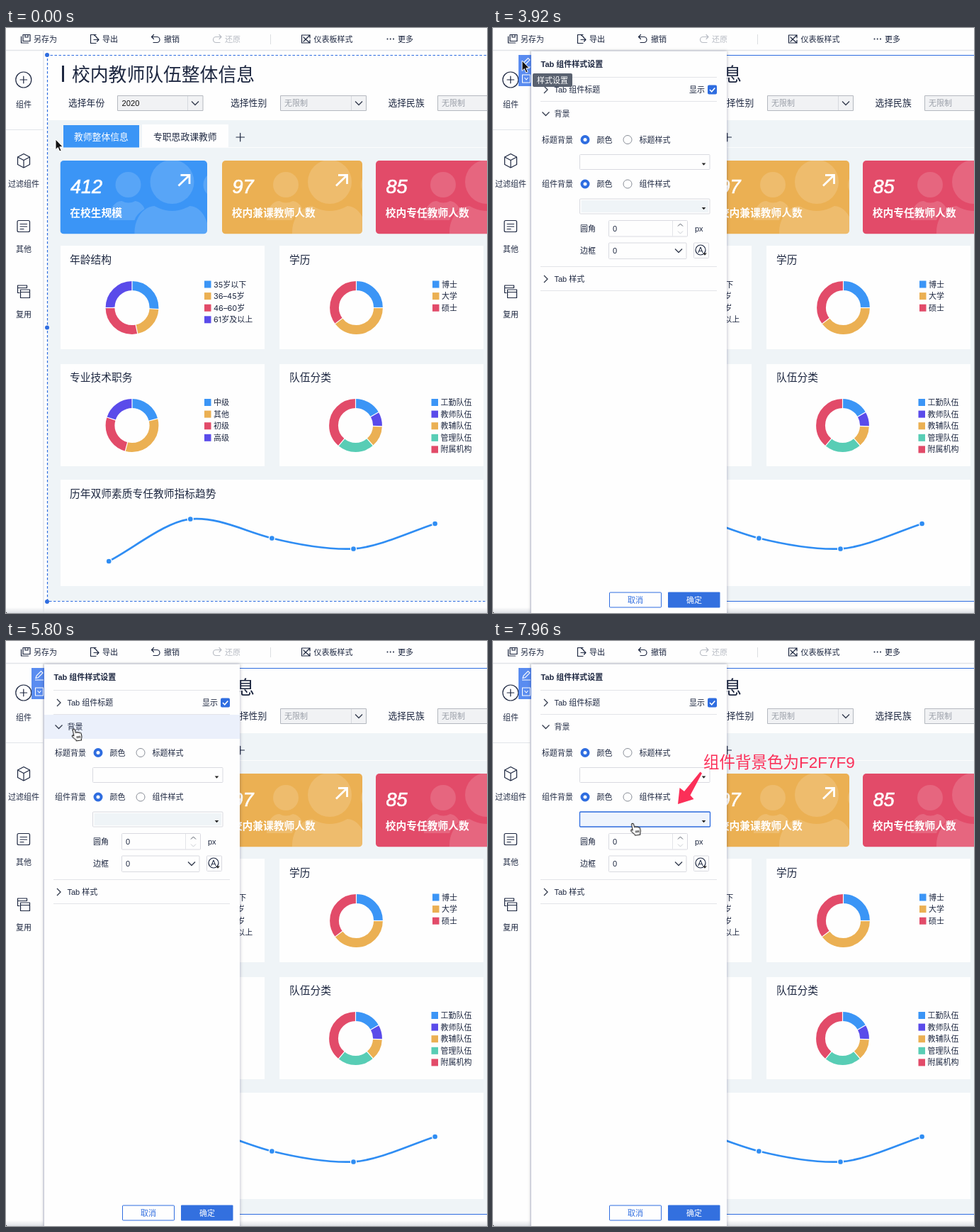
Write an HTML page that moves like this. It is 679 px wide and 825 px high and loops after 8000 ms.

```html
<!DOCTYPE html>
<html lang="zh-CN">
<head>
<meta charset="utf-8">
<title>Dashboard editor</title>
<style>
html, body { margin: 0; width: 100%; height: 100%; overflow: hidden; background: #fefefe; }
svg { display: block; }
#stage { width: 679px; height: 825px; }
text { font: 11px "Liberation Sans", "Noto Sans CJK SC", "Noto Sans CJK", sans-serif; fill: #1d2740; white-space: pre; }
.filter text { font-size: 12.8px; }
.filter .value { font-size: 11.2px; fill: #111; }
.filter .empty { font-size: 11px; fill: #9a9fa8; }
.heading { font-size: 14.75px; }
.legend text { font-family: Inter, "Noto Sans CJK SC", "Noto Sans CJK", sans-serif; }
.number { font-size: 27px; font-style: italic; fill: #fff; stroke: #fff; stroke-width: .7; }
.label { font-size: 14.75px; font-weight: 700; fill: #fff; }
.white { fill: #fff; }
.line { fill: none; stroke: #1d2740; stroke-width: 1.2; stroke-linejoin: round; stroke-linecap: round; }
.field { fill: #fefefe; stroke: #d9dae0; }
.active { stroke: #2f6de0; stroke-width: 1.3; }
.blue { fill: #2f6de0; }

.step { animation: 8s step-end infinite; }
.idle { animation-name: idle; }
.chosen { animation-name: chosen; }
.panel { animation-name: panel; }
.row1 { animation-name: row1; }
.row2 { animation-name: row2; }
.radius { animation-name: radius; }
.colour { animation-name: colour; }
.arrow { animation-name: arrow; }
.hand { animation-name: hand; }
.tip { animation: tip 8s linear infinite; }
.note { animation: note 8s linear infinite; }
.cursor { animation: move 8s linear infinite; }
@keyframes idle { 0% { opacity: 1 } 14%, 100% { opacity: 0 } }
@keyframes chosen { 0% { opacity: 0 } 14%, 100% { opacity: 1 } }
@keyframes panel { 0% { opacity: 0 } 49%, 100% { opacity: 1 } }
@keyframes row1 { 0% { opacity: 0 } 65% { opacity: 1 } 68%, 100% { opacity: 0 } }
@keyframes row2 { 0% { opacity: 0 } 68% { opacity: 1 } 73.5%, 100% { opacity: 0 } }
@keyframes radius { 0% { opacity: 0 } 76.8% { opacity: 1 } 80.3%, 100% { opacity: 0 } }
@keyframes colour { 0% { opacity: 0 } 75.8% { opacity: 1 } 76.8% { opacity: 0 } 80.3%, 100% { opacity: 1 } }
@keyframes arrow { 0% { opacity: 1 } 29% { opacity: 0 } 49% { opacity: 1 } 64.5%, 100% { opacity: 0 } }
@keyframes hand { 0% { opacity: 0 } 29% { opacity: 1 } 49% { opacity: 0 } 64.5%, 100% { opacity: 1 } }
@keyframes tip { 0%, 41.9% { opacity: 0 } 42%, 49.2% { opacity: 1 } 51.5%, 100% { opacity: 0 } }
@keyframes note { 0%, 87.4% { opacity: 0 } 97.5%, 100% { opacity: 1 } }
@keyframes move {
  0%, 23.3% { transform: translate(70px, 157px) }
  23.5% { transform: translate(69px, 155px); animation-timing-function: ease-in-out }
  33.5% { transform: translate(42px, 50px) }
  35.5%, 61.4% { transform: translate(41px, 46px); animation-timing-function: ease-in }
  67.5% { transform: translate(80px, 102px); animation-timing-function: ease-out }
  71.5% { transform: translate(89px, 113px); animation-timing-function: ease-in-out }
  77% { transform: translate(186px, 269px); animation-timing-function: ease-out }
  78.5% { transform: translate(188px, 277px); animation-timing-function: ease-in-out }
  81.5%, 100% { transform: translate(197px, 257px) }
}
</style>
</head>
<body>
<svg id="stage" viewBox="0 0 679 825">
  <defs>
    <path id="down" d="M-5-2.5 0 2.5 5-2.5" fill="none" stroke="#333b4d" stroke-width="1.3"/>
    <path id="right" d="M-2.5-5 2.5 0-2.5 5" fill="none" stroke="#333b4d" stroke-width="1.3"/>
    <path id="caret" d="M-2.8-1.5h5.6L0 1.8z" fill="#222"/>
    <g id="people" fill="#fff" fill-opacity=".15">
      <circle cx="96" cy="34" r="18"/>
      <circle cx="158" cy="30" r="31"/>
      <circle cx="220" cy="34" r="18"/>
      <path d="M69 84C69 68 77 57 87 57Q96 62 106 57C112 58 117 62 119 68Q107 76 105 84Z"/>
      <path d="M105 104C104 82 117 65 133 64Q158 78 183 64C199 65 209 82 210 104Z"/>
    </g>
    <linearGradient id="floor" x2="0" y2="1">
      <stop stop-color="#e1e4e8" stop-opacity="0"/><stop offset="1" stop-color="#dcdfe4"/>
    </linearGradient>
    <filter id="shadow" x="-10%" width="120%" y="-3%" height="106%">
      <feDropShadow dx="0" dy="0" stdDeviation="2.5" flood-color="#223" flood-opacity=".3"/>
    </filter>
  </defs>

  <rect width="679" height="825" fill="#fefefe"/>

  <!-- canvas -->
  <rect x="59" y="130" width="620" height="678" fill="#eff4f7"/>
  <rect x="79" y="53" width="3" height="23" fill="#1d2740"/>
  <text x="93" y="74.5" style="font-size:25.8px">校内教师队伍整体信息</text>

  <g class="filter">
    <text x="88" y="110.3">选择年份</text>
    <text x="317" y="110.3">选择性别</text>
    <text x="539.5" y="110.3">选择民族</text>
    <g fill="#f1f2f4" stroke="#b4b8bf">
      <path d="M157.5 95.5H278V116.5H157.5ZM387.5 95.5H508.5V116.5H387.5ZM609.5 95.5H700V116.5H609.5Z"/>
      <path d="M256.5 96V116M487.5 96V116" stroke="#d6d9de"/>
    </g>
    <text class="value" x="163.5" y="110">2020</text>
    <text class="empty" x="393" y="110">无限制</text>
    <text class="empty" x="615" y="110">无限制</text>
    <use href="#down" x="267" y="106"/><use href="#down" x="498" y="106"/>

    <path d="M59 168.5H679" stroke="#fbfcfd"/>
    <rect x="81" y="137" width="107" height="31.5" fill="#3b95f6"/>
    <rect x="192" y="136" width="122" height="32.5" fill="#fefefe"/>
    <text class="white" x="96" y="158">教师整体信息</text>
    <text x="208" y="158">专职思政课教师</text>
    <path class="line" d="M325 154h11.500M330.700 148.300v11.500"/>
  </g>

  <g id="stats"></g>

  <path fill="#fefefe" d="M77 307H365V453H77ZM386 307H674V453H386ZM77 474H365V618H77ZM386 474H674V618H386ZM77 637H674V787H77Z"/>
  <text class="heading" x="90" y="331.500">年龄结构</text>
  <text class="heading" x="400" y="331.500">学历</text>
  <text class="heading" x="90" y="498">专业技术职务</text>
  <text class="heading" x="400" y="498">队伍分类</text>
  <text class="heading" x="90" y="661.500">历年双师素质专任教师指标趋势</text>
  <g id="rings"></g>
  <path d="M145 752C180 734 225 696 260.500 692.500 300 689 340 711 375.500 719.500 410 728 455 736 490.500 734.500 526 732 570 711 605.500 699" fill="none" stroke="#2f8df3" stroke-width="2.800"/>
  <g id="dots" fill="#2f8df3" stroke="#fff" stroke-width="1.300"></g>

  <!-- selection frame -->
  <g fill="none" stroke="#2f6de0" stroke-width="1.200">
    <path class="step idle" stroke-dasharray="3.500 2.500" d="M690 38.500H58.500V808.500H690"/>
    <path class="step chosen" d="M690 38.500H58.500V808.500H690"/>
  </g>
  <g class="blue"><circle cx="58" cy="38" r="3"/><circle cx="58" cy="422.500" r="3"/><circle cx="58" cy="809" r="3"/></g>

  <!-- toolbar -->
  <path d="M0 31.500H679" stroke="#e2e5e9" stroke-width="1.500"/>
  <path d="M373.500 9V23" stroke="#dcdee2"/>
  <text x="39" y="19.600">另存为</text>
  <text x="136" y="19.600">导出</text>
  <text x="223" y="19.600">撤销</text>
  <text x="309" y="19.600" style="fill:#b8bcc4">还原</text>
  <text x="434.500" y="19.600">仪表板样式</text>
  <text x="553" y="19.600">更多</text>
  <g class="line">
    <path d="M24 9.500H34V18.500H24ZM27 9.500V13H31V9.500M21.500 12V21H31.500"/>
    <path d="M127 9.500H119.500V21.500H127M124 9.500 128 13V14M124 16.500H131M128.500 14 131 16.500 128.500 19"/>
    <path d="M208.500 9.500 205.500 12.500 208.500 15.500M206 12.500H213A4 4 0 0 1 213 20.500H208"/>
    <path style="stroke:#b8bcc4" d="M301 9.500 304 12.500 301 15.500M303 12.500H296.500A4 4 0 0 0 296.500 20.500H302"/>
    <path d="M424 10H417.500V21H429V17M420 13 423 16 420 19M429 10 423 16 429 21M425 10H429V14"/>
  </g>
  <g fill="#1d2740"><circle cx="538.500" cy="15.500" r="1"/><circle cx="542.700" cy="15.500" r="1"/><circle cx="547" cy="15.500" r="1"/></g>

  <!-- sidebar -->
  <path d="M53 32V825" stroke="#e3e6eb" stroke-width="1.500"/>
  <path d="M0 143.500H53" stroke="#e2e5e9"/>
  <g class="line">
    <circle cx="24.800" cy="73" r="11"/><path d="M20 73H29.600M24.800 68.200V77.800"/>
    <path d="M25 177.500 33.500 182V192.500L25 197 16.500 192.500V182ZM16.500 182 25 186.500 33.500 182M25 186.500V197"/>
    <rect x="16" y="271.500" width="17.500" height="16" rx="2"/><path d="M20 276.500H29.500M20 280H29.500M20 283.500H25"/>
    <path d="M19 373.500H16.500V363H29.500V366M16.500 366.500H29.500M20.500 369H33.500V380.500H20.500ZM20.500 372.500H33.500"/>
  </g>
  <text x="14" y="111.700">组件</text>
  <text x="3" y="223.700">过滤组件</text>
  <text x="14" y="315.700">其他</text>
  <text x="14" y="407.700">复用</text>
  <rect y="817" width="679" height="8" fill="url(#floor)"/>

  <g class="step chosen" fill="none" stroke="#fff" stroke-width="1.100">
    <path d="M36 38H58V82H36Z" fill="#5a8cf0" stroke="none"/>
    <path d="M42 52.500 43 49 49.500 42.500 52 45 45.500 51.500ZM41 55H53M41.500 66H52.500V77H41.500ZM44.500 70 47 73 49.500 70"/>
  </g>

  <!-- style panel -->
  <g class="step panel">
    <rect x="54" y="33" width="276" height="800" fill="#fefefe" filter="url(#shadow)"/>
    <path d="M67 69.500H316M67 103.500H316M67 336.500H316M67 370.500H316" stroke="#e3e4e8"/>
    <rect class="step row1" x="54" y="69" width="276" height="35" fill="#ebf0fb"/>
    <rect class="step row2" x="54" y="104" width="276" height="34" fill="#ebf0fb"/>
    <text x="67.500" y="55" font-weight="700" style="font-weight:700">Tab 组件样式设置</text>
    <use href="#right" x="74.500" y="87"/><text x="86.500" y="91">Tab 组件标题</text>
    <text x="277" y="91">显示</text>
    <rect class="blue" x="303" y="80.500" width="13" height="13" rx="2"/>
    <path d="M306 87 308.700 89.800 313.300 84.500" fill="none" stroke="#fff" stroke-width="1.600"/>
    <use href="#down" x="74.500" y="121"/><text x="86.500" y="125">背景</text>
    <use href="#right" x="74.500" y="354"/><text x="86.500" y="358">Tab 样式</text>

    <g fill="#fefefe">
      <circle cx="130" cy="157.500" r="4.500" stroke="#2f6de0" stroke-width="4"/>
      <circle cx="130" cy="220" r="4.500" stroke="#2f6de0" stroke-width="4"/>
      <circle cx="190" cy="157.500" r="6" stroke="#888d96"/>
      <circle cx="190" cy="220" r="6" stroke="#888d96"/>
    </g>
    <text x="69" y="161.700">标题背景</text><text x="146.500" y="161.700">颜色</text><text x="206.500" y="161.700">标题样式</text>
    <text x="69" y="224.200">组件背景</text><text x="146.500" y="224.200">颜色</text><text x="206.500" y="224.200">组件样式</text>

    <rect class="field" x="122.500" y="178.500" width="183.500" height="21" rx="1"/>
    <rect class="field" x="122.500" y="241" width="183.500" height="21" rx="1"/>
    <rect x="124.500" y="243" width="179.500" height="17" fill="#eff4f7"/>
    <rect class="step colour active" x="122.500" y="241" width="184" height="21" rx="1" fill="#eef4fd"/>
    <use href="#caret" x="297.500" y="192"/><use href="#caret" x="297.500" y="254.500"/>

    <text x="123" y="287">圆角</text>
    <rect class="field" x="163.500" y="271.500" width="111" height="22.500" rx="1"/>
    <path d="M253.500 272V294" stroke="#e3e4e8"/>
    <rect class="step radius active" x="163.500" y="271.500" width="111" height="22.500" rx="1" fill="none"/>
    <path d="M261 279.500 264.500 276 268 279.500" fill="none" stroke="#555b66"/>
    <path d="M261 286.500 264.500 290 268 286.500" fill="none" stroke="#c9ccd2"/>
    <text x="169" y="287">0</text><text x="285" y="287">px</text>

    <text x="123" y="318">边框</text>
    <rect class="field" x="163.500" y="303" width="109.500" height="22.500" rx="1"/>
    <text x="169" y="318">0</text><use href="#down" x="262" y="314"/>
    <rect class="field" x="283.500" y="303" width="21" height="21.500" rx="1"/>
    <circle class="line" cx="293" cy="313" r="7"/><text x="289.300" y="317">A</text><use href="#caret" x="299" y="319"/>

    <rect x="164.500" y="796" width="73" height="21" rx="1" fill="#fefefe" stroke="#2f6de0"/>
    <rect x="247" y="795.500" width="73.500" height="22" rx="1" fill="#3370df"/>
    <text x="190" y="810.700" style="fill:#2f6de0">取消</text>
    <text class="white" x="273" y="810.700">确定</text>
  </g>

  <g class="tip">
    <rect x="56" y="64" width="56" height="19" rx="2" fill="#5a6270"/>
    <text class="white" x="62" y="77.700">样式设置</text>
  </g>

  <g class="note" fill="#fb2f58">
    <path d="M292.500 184.500 295 186.500 278.500 217.500 283.500 223 261 230 263.500 207 270 212Z"/>
    <text x="297" y="179.300" style="font-size:22.500px;fill:#fb2f58">组件背景色为F2F7F9</text>
  </g>

  <path d="M0 823.500V825H1.500Z" fill="#222"/>

  <g class="cursor" stroke-linejoin="round">
    <path class="step arrow" d="M0 0V14.500L3.300 11.500 5.700 17 8.200 16 5.800 10.700H10.300Z" fill="#111" stroke="#fff"/>
    <path class="step hand" transform="rotate(-8)" d="M-1.200 10-1.700 2A1.500 1.500 0 0 1 1.300 1.700L1.900 6Q3.300 4.600 4.600 6.200 6.200 5.200 7.200 6.900 9 6.300 9.400 8.300L9.700 12Q9.500 14 8.500 15.500V17.500H1.200V16.300Q-1.300 14-3.300 11.200-4.300 9.400-3 8.900-1.900 8.900-1.200 10ZM3 11V14M5 11V14M7 11V14" fill="#fff" stroke="#222" stroke-width="1.100"/>
  </g>
</svg>

<script>
const blue = '#3b95f6', orange = '#ebb053', red = '#e24b69', purple = '#5a4bea', green = '#58cdb5';
const add = (id, markup) => document.getElementById(id).insertAdjacentHTML('beforeend', markup);

function stat(x, width, color, number, label, shift) {
  add('stats', `<svg x="${x}" y="187" width="${width}" height="103.5">
    <rect width="${width}" height="103.5" rx="5" fill="${color}"/>
    <use href="#people" x="${shift}"/>
    <path d="M167 35.500 182.500 20.500M170 20.500H182.500V33" transform="translate(${shift})" fill="none" stroke="#fff" stroke-width="2.800"/>
    <text class="number" x="14.500" y="45.500">${number}</text>
    <text class="label" x="13.800" y="79">${label}</text></svg>`);
}

// Each slice is [end angle, colour], clockwise from the top.
function ring(cx, cy, slices) {
  let start = 0, arcs = '', gaps = '';
  for (const [end, color] of slices) {
    arcs += `<circle r="31" fill="none" stroke="${color}" stroke-width="12.800" pathLength="360"
      stroke-dasharray="${end - start} 360" stroke-dashoffset="${-start}"/>`;
    gaps += `<path d="M24 0H38" stroke="#fff" stroke-width="1.200" transform="rotate(${end})"/>`;
    start = end;
  }
  add('rings', `<g transform="translate(${cx} ${cy}) rotate(-90)">${arcs}${gaps}</g>`);
}

function legend(x, y, items) {
  const rows = items.map(([name, color], i) => {
    const top = y + i * 16.6;
    return `<rect x="${x}" y="${top - 5}" width="9.500" height="10" fill="${color}"/>
      <text x="${x + 13}" y="${top + 4}">${name}</text>`;
  });
  add('rings', `<g class="legend">${rows.join('')}</g>`);
}

stat(76.5, 207.5, blue, 412, '在校生规模', 0);
stat(305, 198, orange, 97, '校内兼课教师人数', -6);
stat(522, 207, red, 85, '校内专任教师人数', -1);

ring(178, 394.5, [[93, blue], [168, orange], [270, red], [360, purple]]);
ring(494.5, 394.5, [[90, blue], [233, orange], [360, red]]);
ring(178, 560.5, [[75, blue], [195, orange], [288, red], [360, purple]]);
ring(493.5, 560.5, [[60, blue], [92, purple], [139, orange], [220, green], [360, red]]);

legend(280, 361.5, [['35岁以下', blue], ['36–45岁', orange], ['46–60岁', red], ['61岁及以上', purple]]);
legend(602, 361.5, [['博士', blue], ['大学', orange], ['硕士', red]]);
legend(280, 528, [['中级', blue], ['其他', orange], ['初级', red], ['高级', purple]]);
legend(600.5, 528, [['工勤队伍', blue], ['教师队伍', purple], ['教辅队伍', orange], ['管理队伍', green], ['附属机构', red]]);

[752, 692.5, 719.5, 734.5, 699].forEach((y, i) =>
  add('dots', `<circle cx="${145.2 + i * 115.1}" cy="${y}" r="4"/>`));
</script>
</body>
</html>
```
